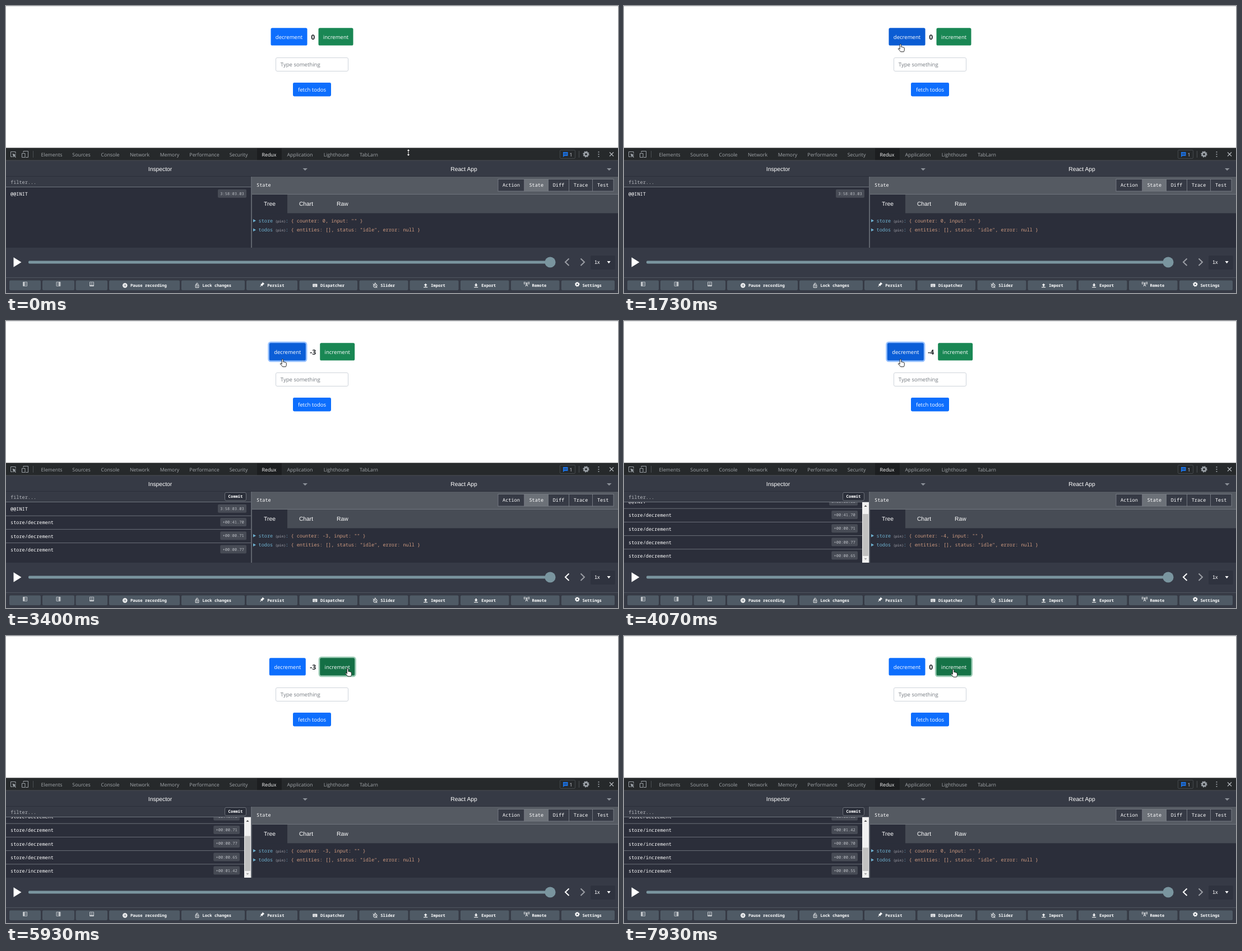
Write an HTML page that moves like this. It is 1092x513 px and loops after 8 s.

```html
<!DOCTYPE html>
<html lang="en">
<head>
<meta charset="utf-8">
<title>Counter with state inspector</title>
<style>
html, body { margin: 0; width: 100%; height: 100%; overflow: hidden; background: #fff; }
svg { display: block; width: 1092px; height: 513px; }
text { white-space: pre; text-rendering: geometricPrecision; fill: #fff; }
.page { font: 9.55px "Open Sans", "Noto Sans", sans-serif; }
.count { font: 700 12.2px "Open Sans", "Noto Sans", sans-serif; fill: #212529; }
.tab { font: 8.8px "Open Sans", "Noto Sans", sans-serif; fill: #a3a7ab; }
.sans { font: 10.3px "Liberation Sans", Arial, sans-serif; }
.mono { font: 8.56px "Noto Sans Mono", "DejaVu Sans Mono", monospace; }
.pin { font: 6.15px "Noto Sans Mono", monospace; fill: #b0b0b8; }
.time { font: 7.08px "Noto Sans Mono", monospace; fill: #b9bcc2; }
.bold { font: 700 7.2px "Noto Sans Mono", monospace; }
.mid { text-anchor: middle; }
.key { fill: #6fb3d2; }
.val { fill: #cf9b80; }
</style>
</head>
<body>
<svg id="stage" viewBox="0 0 1092 513"></svg>
<script>
const rect = (x, y, w, h, fill, more = '') =>
  `<rect x="${x}" y="${y}" width="${w}" height="${h}" fill="${fill}" ${more}/>`;
const text = (x, y, s, cls, more = '') =>
  `<text x="${x}" y="${y}" class="${cls}" ${more}>${s}</text>`;
const path = (d, fill, more = '') => `<path d="${d}" fill="${fill}" ${more}/>`;
const line = (d, color, w = 1) => path(d, 'none', `stroke="${color}" stroke-width="${w}"`);
const at = (x, y, s) => `<g transform="translate(${x} ${y})">${s}</g>`;
const ring = (r, color, w, more = '') =>
  `<circle r="${r}" fill="none" stroke="${color}" stroke-width="${w}" ${more}/>`;
const gear = (r, c) => ring(r * .58, c, r * .5) +
  ring(r * .87, c, r * .3, `stroke-dasharray="${r * .34}"`);

function pageArt() {
  return rect(0, 0, 1092, 513, '#fff') + rect(0, 0, 1092, 1, '#dcdddf') +
    `<g id="dec"><rect class="halo"/>${rect(0, 39.3, 65, 31.3, '#0d6efd', 'rx="2.6" class="face"')}
      ${text(32.5, 58.6, 'decrement', 'page mid')}</g>
    <g id="inc"><rect class="halo"/>${rect(0, 39.3, 62, 31.3, '#198754', 'rx="2.6" class="face"')}
      ${text(31, 58.6, 'increment', 'page mid')}</g>` +
    text(547.8, 59.7, '0', 'count mid', 'id="count"') +
    rect(481.5, 92.5, 129, 24, '#fff', 'rx="2.4" stroke="#ced4da"') +
    text(489.8, 108, 'Type something', 'page', 'style="fill:#757b81"') +
    rect(512, 137, 68, 24.5, '#0d6efd', 'rx="2.4"') +
    text(546, 153, 'fetch todos', 'page mid');
}

function tabBar() {
  const tabs = [['Elements', 81.5], ['Sources', 134.5], ['Console', 186], ['Network', 238.5],
    ['Memory', 292], ['Performance', 354], ['Security', 415], ['Redux', 469.5],
    ['Application', 524.5], ['Lighthouse', 589.5], ['TabLarn', 647.5]];
  const grey = '#9aa0a6';
  return rect(0, 253.5, 1092, 23, '#26292b') + rect(448, 254, 44, 22, '#1c1e20') +
    tabs.map(([s, x]) => text(x, 268.8, s, 'tab mid', s === 'Redux' ? 'style="fill:#fff"' : '')).join('') +
    line('M12 269.5H8.5V260.5H17V264', grey) + path('M11.5 263.5L18.5 266.2L15.7 267.3L18 270L17 271L14.5 268.5L13.4 271Z', grey) +
    line('M31 262V259.5H39.5V270.5H35M28.5 263.5H34V270.5H28.5Z', grey) +
    line('M48.5 259V271M1022.5 259V271', '#4b4f53') +
    rect(988.5, 257.5, 27, 15, 'none', 'rx="1.5" stroke="#44484c"') +
    path('M994 261H1002.5V268H996.5L994 270.3Z', '#1a73e8') + line('M995.5 263.5H1001M995.5 265.5H1001', '#26292b', .7) +
    text(1008, 269, '1', 'tab mid', 'style="fill:#d5d8dc"') +
    at(1035, 265, gear(5.6, grey)) +
    [261, 265, 269].map(y => `<circle cx="1057.5" cy="${y}" r="1.1" fill="${grey}"/>`).join('') +
    line('M1077 261.5L1084 268.5M1084 261.5L1077 268.5', '#b4b8bc', 1.2);
}

function inspector() {
  const cuts = [878, 925, 967.5, 1004.5, 1046.5, 1084];
  const modes = ['Action', 'State', 'Diff', 'Trace', 'Test'];
  const tree = (y, key) => path(`M441 ${y - 5.8}L446 ${y - 3}L441 ${y - .2}Z`, '#6fb3d2') +
    text(450.5, y, key, 'mono key') + text(480.4, y, '(pin)', 'pin') + text(498.8, y, ':', 'mono key');
  return rect(0, 276, 1092, 237, '#363a45') + rect(0, 275.5, 1092, 1, '#4a4e54') +
    text(275, 294.6, 'Inspector', 'sans mid') + text(817, 294.6, 'React App', 'sans mid') +
    path('M529.5 290H538L533.7 294.3ZM1072 290H1080.5L1076.2 294.3Z', '#8b9098') +
    rect(0, 304, 1092, 1, '#2a2e39') +
    rect(0, 324, 437, 108, '#2b2e3a') + line('M0 323.5H437', '#70757e') +
    text(8, 317.5, 'filter...', 'mono', 'style="fill:#b4b7bd"') +
    `<g id="commit">${rect(390.5, 306.5, 38, 14.5, '#2b2f3a', 'rx="2.5" stroke="#6b7079"')}
      ${text(409.5, 316.4, 'Commit', 'bold mid')}</g>
    <g clip-path="url(#list)"><g id="rows"></g></g><g id="bar"></g>` +
    line('M438 305V432', '#5f646d', 2) +
    rect(439, 305, 653, 31, '#555a62') + rect(439, 336, 653, 1, '#70757d') +
    rect(439, 337, 653, 33.5, '#474c55') + rect(439, 337, 63, 34, '#2b2e3a') +
    rect(439, 370.5, 653, 61.5, '#2b2e3a') + text(447, 323, 'State', 'mono') +
    modes.map((s, i) => {
      const x = cuts[i], w = cuts[i + 1] - x;
      return rect(x, 309.5, w, 21.5, i === 1 ? '#6c7178' : '#363a45', 'stroke="#747981"') +
        text(x + w / 2, 323, s, 'mono mid', 'font-weight="600"');
    }).join('') +
    text(470.5, 357, 'Tree', 'sans mid') + text(535.5, 357, 'Chart', 'sans mid') + text(600.3, 357, 'Raw', 'sans mid') +
    tree(386.8, 'store') + text(508.4, 386.8, '', 'mono val', 'id="store"') +
    tree(403.2, 'todos') + text(508.4, 403.2, '{ entities: [], status: "idle", error: null }', 'mono val');
}

function player() {
  return rect(0, 432, 1092, 53, '#363a46') +
    path('M13.5 449.3L27.5 458L13.5 466.7Z', '#fff') +
    rect(40, 455.4, 931, 5.2, '#7a959f', 'rx="2"') + '<circle cx="971" cy="458" r="9.6" fill="#7a959f"/>' +
    path('M1004.5 451.5L998 457.8L1004.5 464', 'none', 'id="back" stroke-width="2"') +
    line('M1025.5 451.5L1032 457.8L1025.5 464', '#9b9ea5', 2) +
    rect(1043, 446, 44, 25, '#2f333f', 'rx="2"') + text(1050, 461.3, '1x', 'sans', 'style="font-size:9.2px"') +
    path('M1072.5 456H1078.7L1075.6 460.3Z', '#fff');
}

function toolbar() {
  const w = '#fff';
  const grid = extra => ring(0, w, 0) + line('M-3.5-3.5H3.5V3.5H-3.5Z', '#d5d8dc', .8) +
    line('M-3.5 0H3.5M0-3.5V3.5', '#aeb4ba', .8) + line(extra, w, 1.3);
  const arrow = up => path(up ? 'M0-3.6L3-.4H1V2H-1V-.4H-3Z' : 'M0 2L3-1.2H1V-3.6H-1V-1.2H-3Z', w) + line('M-3.5 3.2H3.5', w, 1.1);
  const items = [
    [6, 62, 34, 497, grid('M-2-3.5V3.5')], [65, 122, 93.5, 497, grid('M2-3.5V3.5')], [124.5, 181, 153, 497, grid('M-3.5 3H3.5')],
    [184, 310, 212.3, 499.5, `<circle r="4.2" fill="${w}"/>` + line('M-1.2-2V2M1.2-2V2', '#4f5a65', 1), 'Pause recording', 222],
    [313, 426, 341, 499.5, line('M-2.8-1H2.8V3.8H-2.8ZM-1.7-1V-2.5Q-1.7-4 0-4T1.7-2.5', w, .9) + `<circle cy="1.4" r=".8" fill="${w}"/>`, 'Lock changes', 350.4],
    [429, 520, 457.3, 497.5, path('M.5-4L4-.5L2.6-.2L.6 1.8L.5 3.4L-1 2L-3.6 4.2L-4 3.8L-2 1L-3.4-.5L-1.8-.6L.2-2.6Z', w), 'Persist', 466.3],
    [523.5, 627, 551.3, 499.5, rect(-4, -2.8, 8, 5.6, w, 'rx=".8"') + line('M-3-1.2H3M-3 .2H3', '#4f5a65', .7).replace('/>', ' stroke-dasharray=".9 .6"/>') + line('M-2 1.7H2', '#4f5a65', .7), 'Dispatcher', 561],
    [630.5, 717.5, 658.8, 500, ring(3.2, w, 1) + line('M-4-3.6L3.6 4M-1.2-4.6H1.2M0 0V-1.8', w, .9), 'Slider', 668.3],
    [720.5, 807.5, 748.7, 499.5, arrow(true), 'Import', 758],
    [811, 897.5, 838.7, 499.5, arrow(false), 'Export', 848.3],
    [901, 987.5, 929, 497.3, line('M-2 4L0-1.5L2 4M-1 2H1M-2.2-4Q-3.6-2-2.2 0M2.2-4Q3.6-2 2.2 0M-4-4.5Q-5.6-2-4 .5M4-4.5Q5.6-2 4 .5', w, .8) + `<circle cy="-2" r="1" fill="${w}"/>`, 'Remote', 938.4],
    [991, 1086, 1019.3, 497.5, gear(4.2, w), 'Settings', 1028.4]
  ];
  return rect(0, 485, 1092, 1, '#50555f') + items.map(([l, r, x, y, art, s, tx]) =>
    rect(l, 490.6, r - l, 17.4, '#4f5a65', 'rx="2"') + at(x, y, art) +
    (s ? text(tx, 502, s, 'bold') : '')).join('');
}

const cursors = {
  ns: path('M0-6.3L2.8-3H.8V3H2.8L0 6.3L-2.8 3H-.8V-3H-2.8Z', '#fff', 'stroke="#000" stroke-width=".5"'),
  arrow: path('M0 0V11L2.6 8.6L4.4 12.6L6 11.9L4.3 8H7.6Z', '#fff', 'stroke="#000" stroke-width=".8"'),
  beam: line('M-3-4.8Q0-4.8 0-3.8V3.8Q0 4.8-3 4.8M3-4.8Q0-4.8 0-3.8M0 3.8Q0 4.8 3 4.8', '#222', .9),
  hand: path('M-1.2 9V1.2Q-1.2 0 .1 0T1.4 1.2V5Q3 4.3 3.6 5.4Q5 5 5.5 6Q7 5.8 7 7.4V10Q7 12 5.8 13.6H.3Q-1.5 11.2-4 8.6Q-3.6 6.8-2 7.8Z',
    '#fff', 'stroke="#111" stroke-width=".9" stroke-linejoin="round"')
};

const stage = document.getElementById('stage');
stage.innerHTML = '<defs><clipPath id="list"><rect y="324" width="437" height="108"/></clipPath></defs>' +
  pageArt() + tabBar() + inspector() + player() + toolbar() + '<g id="cursor"></g>';
const $ = id => document.getElementById(id);

// All times below are ticks of 1/15 s.
const RATE = 15, LOOP = 8000;
// press, counter change, log change, settled, step, delay shown
const clicks = [
  [26, 28, 30, 31, -1, '41.70'], [36, 38, 39, 40, -1, '00.71'],
  [47, 49, 50, 51, -1, '00.77'], [57, 59, 60, 61, -1, '00.65'],
  [78, 79, 80, 81, 1, '01.42'], [89, 90, 91, 92, 1, '00.70'],
  [100, 101, 102, 102, 1, '00.68'], [108, 109, 110, 111, 1, '00.55']
];
// tick, x, y, cursor kind from here on
const moves = [
  [0, 718, 262, 'ns'], [1, 704, 252, 'arrow'], [4, 610, 205, 'arrow'], [6, 520, 172, 'arrow'],
  [8, 457, 140, 'arrow'], [10, 476, 118, 'arrow'], [11, 487, 106, 'beam'], [13, 493, 89, 'beam'],
  [14, 493, 80, 'arrow'], [15, 493, 73, 'hand'], [17, 493.3, 68.2, 'hand'], [64, 493.3, 68.2, 'hand'],
  [66, 541, 66, 'arrow'], [67, 573, 62, 'hand'], [69, 609.5, 58.5, 'hand'], [116, 609.5, 58.5, 'hand'],
  [119, 587.5, 59.7, 'hand']
];

const clamp = v => Math.max(0, Math.min(1, v));
const fade = (n, start) => n < start ? 0 : clamp((n - start + .5) / 2.25);
const mix = (a, b, k) => a.map((v, i) => v + (b[i] - v) * k);
const rgb = c => `rgb(${c.map(Math.round)})`;

function pressed(n, step) {
  let k = 0;
  for (const [down, , , end, s] of clicks)
    if (s === step && n >= down && n < end) k = Math.sin(Math.PI * (n - down + .6) / (end - down + .4));
  return k;
}

function paintButton(id, x, w, colors, hover, press, halo, haloColor) {
  const g = $(id), spread = 2.6 * halo, h = g.querySelector('.halo');
  g.setAttribute('transform', `translate(${x} 0)`);
  g.querySelector('.face').setAttribute('fill', rgb(mix(mix(colors[0], colors[1], hover), colors[2], press)));
  const box = { x: -spread, y: 39.3 - spread, width: w + 2 * spread, height: 31.3 + 2 * spread,
    rx: 2.6 + spread, fill: haloColor, opacity: .5 * halo };
  for (const k in box) h.setAttribute(k, box[k]);
}

function paintLog(log) {
  const ROW = 24.2, total = ROW * (log.length + 1), over = total > 108;
  const scroll = over ? total - 108 : 0, shift = over ? -12 : 0;
  const entries = [['@@INIT', '3:58:03.03'],
    ...log.map(c => [c[4] < 0 ? 'store/decrement' : 'store/increment', '+00:' + c[5]])];
  $('rows').innerHTML = entries.map(([name, time], i) => {
    const y = 324 + ROW * i - scroll, w = time.length * 4.25 + 8.5;
    return text(8, y + 15.1, name, 'mono') +
      rect(429 + shift - w, y + 3.8, w, 15, '#474b55', 'rx="2"') +
      text(424.8 + shift, y + 14, time, 'time', 'text-anchor="end"') +
      (i < entries.length - 1 ? rect(0, y + 23.7, 437, 1, '#6c7079') : '');
  }).join('');
  const thumb = 84 * 108 / total;
  $('bar').innerHTML = over ? rect(425, 324, 12, 108, '#f1f1f1') +
    rect(426, 420 - thumb, 10, thumb, '#c1c1c1') +
    path('M428.5 332H433.5L431 329Z', '#505050') + path('M428.5 424H433.5L431 427Z', '#a3a3a3') : '';
}

function paintCursor(n) {
  let i = moves.length - 1;
  while (moves[i][0] > n) i--;
  const a = moves[i], b = moves[i + 1] || a, k = b === a ? 0 : (n - a[0]) / (b[0] - a[0]);
  const [x, y] = mix([a[1], a[2]], [b[1], b[2]], k);
  $('cursor').innerHTML = at(x, y, cursors[a[3]]);
}

function paint(n) {
  const count = clicks.reduce((sum, c) => sum + (n >= c[1] ? c[4] : 0), 0);
  const log = clicks.filter(c => n >= c[2]);
  const logged = log.reduce((sum, c) => sum + c[4], 0);
  const off = count ? 2.7 : 0, swap = fade(n, 78);
  paintButton('dec', 472.5 - off, 65, [[13, 110, 253], [11, 94, 215], [10, 88, 202]],
    fade(n, 15) - swap, pressed(n, -1), fade(n, 26) - swap, '#3184fd');
  paintButton('inc', 557.5 + off, 62, [[25, 135, 84], [21, 115, 71], [20, 108, 67]],
    fade(n, 67), pressed(n, 1), swap, '#3c996e');
  $('count').textContent = count;
  $('store').textContent = `{ counter: ${logged}, input: "" }`;
  $('commit').style.display = log.length ? '' : 'none';
  $('back').setAttribute('stroke', log.length ? '#fff' : '#9b9ea5');
  paintLog(log);
  paintCursor(n);
}

const start = performance.now();
let shown = -1;
function tick() {
  const t = (performance.now() - start) % LOOP;
  const n = Math.floor((t + 4) * RATE / 1000) % (LOOP * RATE / 1000);
  if (n !== shown) paint(shown = n);
  requestAnimationFrame(tick);
}
tick();
</script>
</body>
</html>
```
